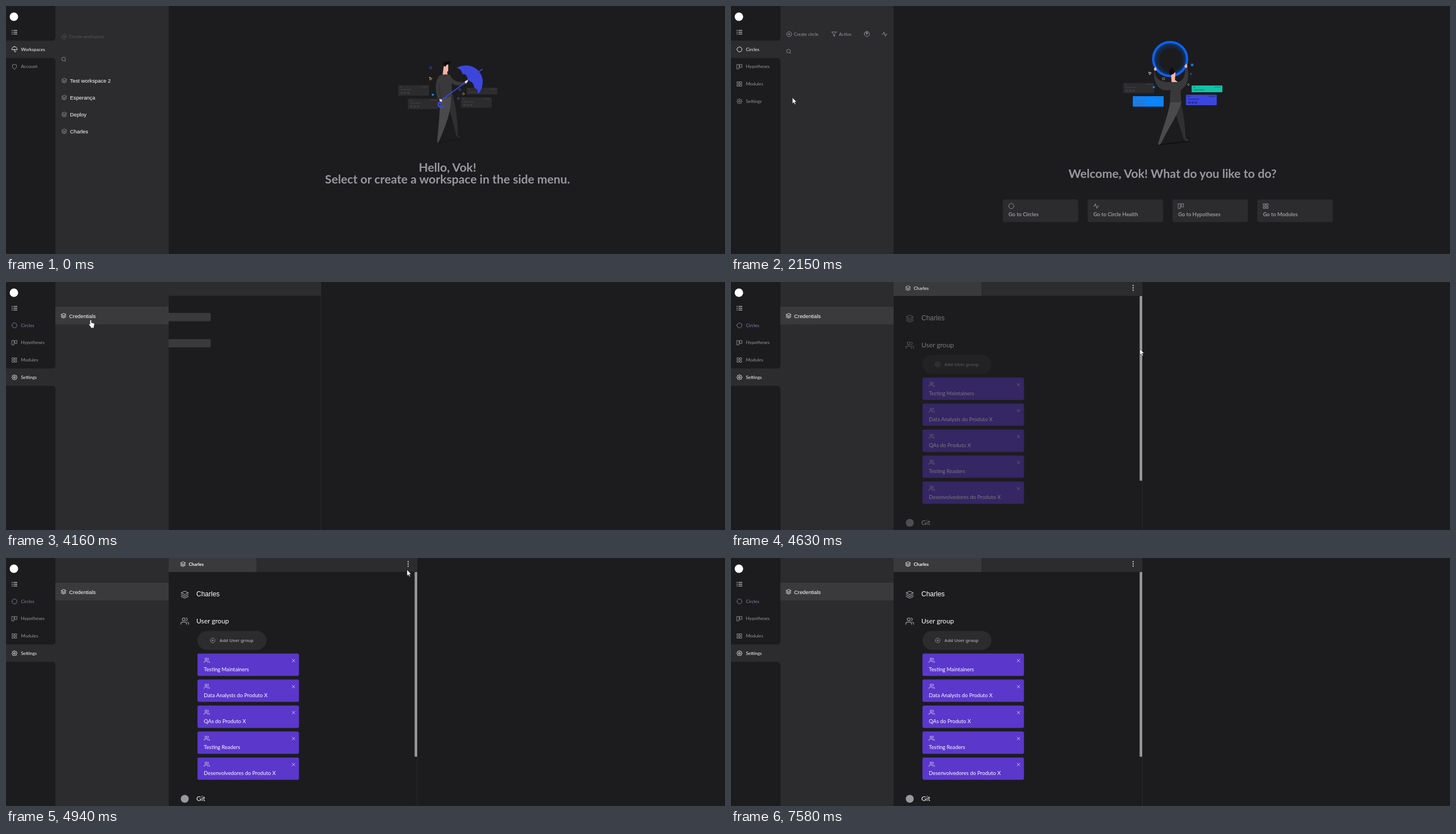
Write an HTML page that moves like this. It is 1273 px wide and 440 px high and loops after 7.96 s.

```html
<!DOCTYPE html>
<html lang="en">
<head>
<meta charset="utf-8">
<style>
html, body { margin: 0; width: 100%; height: 100%; overflow: hidden; background: #1c1c1e; }
svg { display: block; width: 1273px; height: 440px; }
text { font-family: Lato, sans-serif; white-space: pre; }
.sans { font-family: "Liberation Sans", Arial, sans-serif; }
.bold { font-weight: 700; }
.mid { text-anchor: middle; }
.icon { fill: none; stroke-width: 2; stroke-linecap: round; stroke-linejoin: round; }
</style>
</head>
<body>
<svg id="stage" viewBox="0 0 1273 440" xmlns="http://www.w3.org/2000/svg"></svg>
<script>
const LOOP = 7960;
const DARK = '#1c1c1e', PANEL = '#2c2c2e', RAISED = '#3a3a3c', GREY = '#98989e', WHITE = '#fff';
const INDIGO = '#3c46dd', BLUE = '#0a84ff', PURPLE = '#5b37cc', SKIN = '#f5b3a3';

const gear = 'M' + Array.from({ length: 48 }, (_, i) => {
  const a = i * Math.PI / 24, r = 9.3 + 1.5 * Math.cos(8 * a);
  return (12 + r * Math.cos(a)).toFixed(1) + ' ' + (12 + r * Math.sin(a)).toFixed(1);
}).join('L') + 'Z';
const disc = (x, y, r) => `M${x - r} ${y}a${r} ${r} 0 1 0 ${2 * r} 0a${r} ${r} 0 1 0 ${-2 * r} 0`;

const ICONS = {
  list: 'M9 5H22M9 12H22M9 19H22M2 5H4M2 12H4M2 19H4',
  umbrella: 'M23 12A11 11 0 0 0 1 12ZM12 1V0M18 19A3 3 0 0 1 12 19V12',
  shield: 'M12 22S20 18 20 12V5L12 2 4 5V12C4 18 12 22 12 22Z',
  layers: 'M12 2 2 7 12 12 22 7ZM2 17 12 22 22 17M2 12 12 17 22 12',
  plus: disc(12, 12, 10) + 'M12 8V16M8 12H16',
  search: disc(11, 11, 8) + 'M21 21 16.7 16.7',
  circle: disc(12, 12, 10),
  columns: 'M2 3H10V21H2ZM14 3H22V15H14Z',
  grid: 'M3 3H10V10H3ZM14 3H21V10H14ZM14 14H21V21H14ZM3 14H10V21H3Z',
  gear: gear + disc(12, 12, 3.5),
  filter: 'M22 3H2L10 12.5V19L14 21V12.5Z',
  clock: disc(12, 12, 10) + 'M9 6H15V11L12 14 9 11ZM12 7V12',
  pulse: 'M22 12H18L15 21 9 3 6 12H2',
  users: disc(9, 7, 4) + 'M1 21V19A4 4 0 0 1 5 15H13A4 4 0 0 1 17 19V21M23 21V19A4 4 0 0 0 20 15.1M16 3.1A4 4 0 0 1 16 10.9',
  close: 'M5 5 19 19M19 5 5 19',
  copy: 'M9 9H22V22H9ZM5 15H2V2H15V5'
};

const icon = (name, cx, cy, size = 10.5, color = GREY) =>
  `<path class="icon" d="${ICONS[name]}" stroke="${color}" transform="translate(${cx - size / 2} ${cy - size / 2}) scale(${size / 24})"/>`;
const rect = (x, y, w, h, fill, r = 0) => `<rect x="${x}" y="${y}" width="${w}" height="${h}" rx="${r}" fill="${fill}"/>`;
const dot = (x, y, r, fill) => `<circle cx="${x}" cy="${y}" r="${r}" fill="${fill}"/>`;
const shape = (d, fill) => `<path d="${d}" fill="${fill}"/>`;
const line = (d, stroke, w = 1) => `<path d="${d}" fill="none" stroke="${stroke}" stroke-width="${w}" stroke-linecap="round"/>`;
const text = (s, x, y, size, fill = GREY, cls = '') => `<text x="${x}" y="${y}" font-size="${size}" fill="${fill}" class="${cls}">${s}</text>`;
const group = (id, body) => `<g id="${id}">${body}</g>`;
const heading = (s, y) => text(s, 781.7, y, 21.2, GREY, 'bold mid');

function sidebar(id, active, items, firstColor) {
  const top = 61.5 + active * 30.7, bottom = top + 30.7;
  const rows = items.map(([name, label], i) => {
    const y = 77 + i * 30.7;
    const color = i === active ? WHITE : i === 0 && firstColor || GREY;
    return `<g color="${color}" data-base="${color}">` + icon(name, 15, y, 10.5, 'currentColor') +
      text(label, 26.5, y + 2.7, 8, 'currentColor') + '</g>';
  });
  return group(id,
    shape(`M0 0H87.5V${top - 6}q0 6 -6 6H0Z`, DARK) +
    shape(`M0 ${bottom}H81.5q6 0 6 6V440H0Z`, DARK) +
    dot(14, 19, 7.5, WHITE) + icon('list', 15, 46.5, 11, WHITE) + rows.join(''));
}

function infoCard(x, y, h, fill, detail) {
  let s = rect(x, y, 54.5, h, fill, 1) + rect(x + 40, y + 2, 12, 1.5, detail) +
    dot(x + 5, y + 3, 1.5, detail) + rect(x + 4, y + 7, 19, 1.8, detail);
  if (h > 15) for (let i = 0; i < 3; i++) s += dot(x + 6 + i * 6, y + 13.7, 2.3, detail);
  return s;
}

const umbrellaMan =
  infoCard(694.5, 140.5, 18.5, PANEL, RAISED) + infoCard(711.5, 164.5, 18.5, PANEL, RAISED) +
  infoCard(815.5, 145, 12, PANEL, RAISED) + infoCard(805.5, 162, 18.5, PANEL, RAISED) +
  line(disc(752, 109.5, 1.8), INDIGO) + line('M750 126.5 754.5 128.5 751.5 131.3Z', '#f0b040') +
  dot(755.7, 157.5, 2, BLUE) + line(disc(803.5, 148.5, 1.8), INDIGO) + line(disc(801, 164, 1.8), INDIGO) +
  line('M810 153.8 811.8 155.8 810 157.8 808.2 155.8Z', '#d89038') +
  line('M765 242.5 806 236', '#141416') +
  shape('M778 160L791 158C798 185 800 210 800 229L806 235 802 234 797 230C792 205 785 185 778 160Z', '#303032') +
  shape('M768 162L788 160C789 187 777 215 768 237L765 243 763.5 242C764 225 769 195 768 162Z', '#4a4a4c') +
  shape('M775 107L783 103 783 115 781 117 782 122 773 123Z', SKIN) +
  shape('M774 104C773 100 776 97 780 99Q783 97 787 98L786 103 780 104 778 108Z', '#0c0c12') +
  shape('M798 109.5C820 99 841 111 844 131Q845 146 836 156C836 150 833 146 829 145 829 138 824 133 817 132 818 125 814 120 808 121 807 114 803 111 798 109.5Z', INDIGO) +
  line('M836 117 843 112.5', INDIGO, 2) +
  line('M769 170A5 5 0 1 0 775 177', INDIGO, 3) +
  shape('M768 123Q777 120 786 122C791 133 801 137 814 134L815 138C805 142 795 142 789 137L790 160 768 165 764 164C759 148 760 131 768 123Z', '#39393b') +
  line('M768 138Q766 154 772 164', '#2a2a2c', 1) +
  line('M817 133 772 166', INDIGO, 1.6) +
  shape('M812 134 817 131 818 134 814 138Z', '#e8d8d8') + shape('M767 165 772 166 772 170 768 169Z', '#e8d8d8');

const ringMan =
  infoCard(694.5, 136.5, 18, PANEL, RAISED) + infoCard(711.5, 160, 18.5, BLUE, '#3a70b8') +
  infoCard(815.5, 141, 12, '#10c4a8', '#159080') + infoCard(805.5, 157.5, 18.5, INDIGO, '#292f98') +
  dot(777.5, 94, 30, '#14305c') + dot(778, 94.5, 25, '#162540') + dot(779, 95.5, 21, DARK) +
  `<circle cx="777.5" cy="94" r="30" fill="none" stroke="#0a64f8" stroke-width="4"/>` +
  line('M739.8 117.3 744 118.5 741.5 121.8Z', '#ccc') + line('M764.3 127.3H767.7V130.7H764.3Z', '#888') +
  rect(814.5, 102.5, 4, 4, BLUE) + line(disc(814, 120.5, 1.5), '#1560c0') + dot(748.5, 144, 2, BLUE) +
  line('M810 137.8 811.6 139.5 810 141.2 808.4 139.5Z', '#999') +
  line('M757 246 811 240', '#0c0c0e', 1.5) +
  shape('M781 168H795C802 190 804 215 805 234L811 239 805 240 801 235C796 215 786 190 781 168Z', '#303032') +
  shape('M778 168 798 169C792 193 773 218 763 241L759 246.5 756 245C763 220 774 195 778 168Z', '#4a4a4c') +
  shape('M779 119 787 118 786 131 791 135 780 137Z', SKIN) +
  shape('M776 121C774 114 779 110 782 109L783 113Q787 116 784 120L778 123Z', '#0c0c12') +
  shape('M750 111C750 127 756 136 779 135L791 135C803 132 804 121 804 110L808 109C812 127 808 143 796 149L797 171H777L778 149C757 154 746 135 750 111Z', '#39393b') +
  shape('M748.5 111 752 108 754 114 750 115Z', SKIN) + shape('M803 106 807 102 808 109 804 110Z', SKIN);

const workspaceList = icon('plus', 103, 54.5, 10, '#55555a') + text('Create workspace', 111.5, 57.3, 8, '#55555a') +
  icon('search', 102.3, 94.5, 10) +
  ['Test workspace 2', 'Esperança', 'Deploy', 'Charles'].map((name, i) =>
    icon('layers', 103, 132.5 + i * 30, 10) + text(name, 113.3, 136 + i * 30, 9.33, WHITE, 'sans')).join('');

const circleTools = icon('plus', 103, 50, 10.5) + text('Create circle', 111.3, 52.7, 8) +
  icon('filter', 182.5, 50, 10.5) + text('Active', 191, 52.7, 8) +
  icon('clock', 240.5, 49.5, 11) + icon('pulse', 272, 50, 10.5) + icon('search', 102.3, 80.5, 10);

const shortcuts = [['circle', 'Circles'], ['pulse', 'Circle Health'], ['columns', 'Hypotheses'], ['grid', 'Modules']]
  .map(([name, label], i) => {
    const x = 481.3 + i * 150.2;
    return rect(x, 343.3, 133.5, 40, PANEL, 3) + icon(name, x + 15, 355, 11) +
      text('Go to ' + label, x + 10, 373, 9.33, GREY, 'bold');
  }).join('');

const userGroups = ['Testing Maintainers', 'Data Analysts do Produto X', 'QAs do Produto X', 'Testing Readers', 'Desenvolvedores do Produto X']
  .map((name, i) => {
    const y = 169.5 + i * 46.1;
    return rect(339, y, 179.7, 39.7, PURPLE, 3) + icon('users', 355.5, y + 12, 10.5, '#ddd') +
      icon('close', 509, y + 12.6, 8, WHITE) + text(name, 350.3, y + 31.5, 9.33, WHITE);
  }).join('');

const settings = icon('layers', 316.5, 65, 15) + text('Charles', 337, 68, 12, WHITE, 'sans') +
  icon('users', 316.5, 112, 15) + text('User group', 337, 115.5, 12, WHITE) +
  rect(339, 129.5, 122, 33.5, PANEL, 16.7) + icon('plus', 366, 146.3, 10) +
  text('Add User group', 377.7, 149, 8, GREY, 'sans bold') + userGroups +
  dot(316.5, 427.3, 7, GREY) + text('Git', 337, 430.5, 12, WHITE);

const menuItems = [['circle', 'Circles'], ['columns', 'Hypotheses'], ['grid', 'Modules'], ['gear', 'Settings']];
const stage = document.getElementById('stage');
stage.innerHTML = rect(0, 0, 1273, 440, DARK) +
  group('drawer', rect(288, 0, 440, 24.7, PANEL) + rect(727.5, 0, 1, 440, PANEL) +
    group('skeleton', rect(340, 54.7, 193, 14.7, RAISED, 3) + rect(340, 101.3, 193, 14.7, RAISED, 3)) +
    group('loaded', rect(288, 0, 155.3, 24.7, RAISED) +
      group('tab', icon('layers', 313.3, 11, 10, WHITE) + text('Charles', 323.5, 14, 8, WHITE, 'bold')) +
      [6.5, 10.5, 14.5].map(y => dot(712, y, 1.15, '#ccc')).join('') +
      group('settings', settings) + rect(723.5, 25, 4.5, 327.5, '#98989a'))) +
  group('dropdown', rect(621, 25, 90, 27, RAISED, 3) + icon('copy', 632, 38.5, 9, WHITE) + text('Copy ID', 641, 41.3, 8, WHITE)) +
  rect(0, 0, 288, 440, PANEL) +
  sidebar('sideHome', 0, [['umbrella', 'Workspaces'], ['shield', 'Account']]) +
  sidebar('sideCircles', 0, menuItems) + sidebar('sideSettings', 3, menuItems, '#8585ad') +
  group('workspaces', workspaceList) + group('circles', circleTools) +
  group('credentials', `<rect id="selected" x="87.5" y="44" width="200.5" height="31.3" fill="${RAISED}"/>` +
    group('entry', icon('layers', 101.8, 60, 10, 'currentColor') + text('Credentials', 111.8, 63.5, 9.33, WHITE, 'sans'))) +
  group('umbrellaMan', umbrellaMan) +
  group('helloHome', heading('Hello, Vok!', 294.3) + heading('Select or create a workspace in the side menu.', 315.3)) +
  group('welcome', ringMan + heading('Welcome, Vok! What do you like to do?', 305) + shortcuts) +
  group('helloSetup', heading('Hello, Vok!', 303.5) + heading('You need to set up your workspace in the side menu to use Charles.', 324.7)) +
  group('arrow', `<path d="M0 0V10.6L2.4 8.5 4.2 12.3 5.8 11.5 4.1 7.8H7.4Z" fill="#fff" stroke="#111" stroke-width=".5"/>`) +
  group('hand', `<path d="M-1.2 1.2Q0-.8 1.2 1.2V5.2L5.4 6.2Q6.8 6.8 6.5 8.6L5.6 12V14.5H.2V13L-3 9.2Q-3.6 7.4-2 7.4L-1.2 8.3Z" fill="#fff" stroke="#222" stroke-width=".5"/>`);

const el = {};
stage.querySelectorAll('g[id], rect[id]').forEach(node => el[node.id] = node);
const show = (id, visible) => el[id].style.display = visible ? '' : 'none';
const fade = (id, opacity) => el[id].setAttribute('opacity', opacity);
const progress = (t, a, b) => Math.min(1, Math.max(0, (t - a) / (b - a)));

// Pointer path: time, x, y
const PATH = [
  [70, 828, 302], [300, 590, 278], [550, 290, 242], [830, 139, 226], [2140, 139, 226],
  [2150, 109, 163], [2310, 72, 94], [2430, 52, 125], [2550, 40, 175], [3200, 40, 174],
  [3620, 150, 67], [4230, 150, 67], [4400, 500, 105], [4630, 724, 119], [4940, 710, 21],
  [5090, 710, 8], [5350, 709, 10], [5700, 698, 48], [6040, 672, 38], [6180, 659, 35],
  [6410, 656, 30], [6580, 660, 37], [6890, 660, 37], [7500, 1242, 428], [7580, 1250, 440]
];
const HANDS = [[900, 1150], [2700, 3220], [3700, 4240], [5090, 5450], [6180, 6580]];

function pointerAt(t) {
  const i = Math.max(1, PATH.findIndex(p => p[0] >= t));
  const [a, b] = [PATH[i - 1], PATH[i]];
  const k = progress(t, a[0], b[0]);
  return [a[1] + (b[1] - a[1]) * k, a[2] + (b[2] - a[2]) * k];
}

function render(t) {
  const home = t < 1070, circles = !home && t < 2870, setup = t >= 2870, drawer = t >= 4010;
  show('sideHome', home);
  show('workspaces', home);
  show('helloHome', home);
  show('sideCircles', circles);
  show('circles', circles);
  show('welcome', circles);
  fade('welcome', progress(t, 1150, 1550));
  show('sideSettings', setup);
  show('credentials', setup);
  show('umbrellaMan', home || setup && !drawer);
  show('helloSetup', setup && !drawer);
  fade('helloSetup', progress(t, 2880, 3240));
  show('selected', t >= 3930);
  el.entry.setAttribute('color', t >= 3930 ? WHITE : GREY);

  show('drawer', drawer);
  const rest = 1 - progress(t, 4010, 4410);
  el.drawer.setAttribute('transform', `translate(${-440 * rest * rest} 0)`);
  show('skeleton', t < 4480);
  show('loaded', t >= 4480);
  fade('settings', progress(t, 4480, 4855));
  fade('tab', 0.6 + 0.4 * progress(t, 4480, 4855));
  show('dropdown', t >= 5250 && t < 6580);

  const [x, y] = pointerAt(t);
  const visible = t >= 70 && t < 7580;
  const hand = HANDS.some(([a, b]) => t >= a && t < b);
  show('arrow', visible && !hand);
  show('hand', visible && hand);
  el.arrow.setAttribute('transform', `translate(${x} ${y})`);
  el.hand.setAttribute('transform', `translate(${x} ${y})`);

  const hovered = circles && x < 87 ? Math.floor((y - 61.5) / 30.7) : -1;
  el.sideCircles.querySelectorAll('g').forEach((row, i) =>
    row.setAttribute('color', i === hovered ? WHITE : row.dataset.base));
}

const start = performance.now();
function tick() {
  render((performance.now() - start) % LOOP);
  requestAnimationFrame(tick);
}
render(0);
requestAnimationFrame(tick);
</script>
</body>
</html>
```
